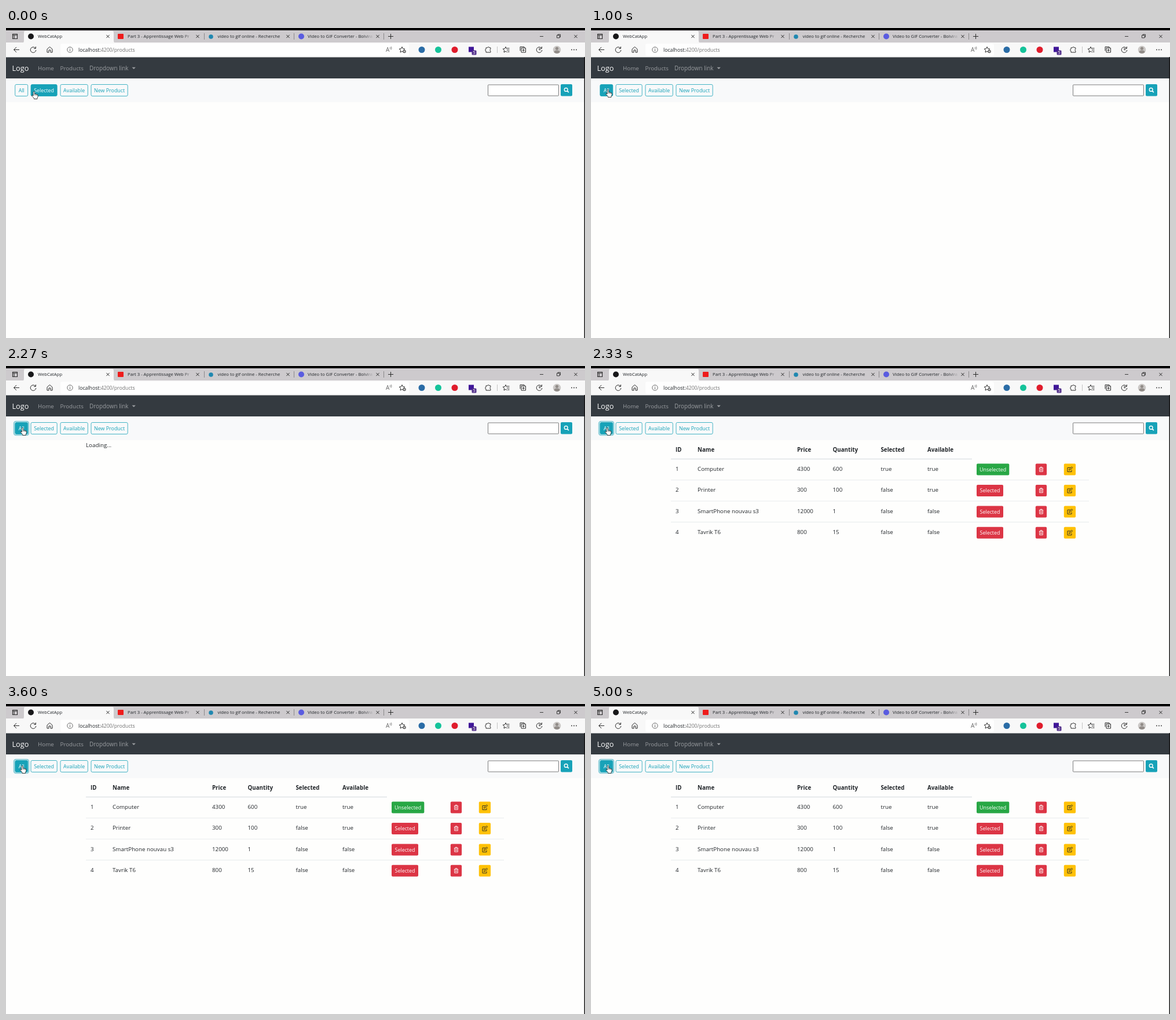
Write an HTML page that moves like this. It is 1000 px wide and 535 px high and loops after 5070 ms.

```html
<!DOCTYPE html>
<html lang="en">
<head>
<meta charset="utf-8">
<title>Product catalogue</title>
<style>
  html, body { margin: 0; width: 100%; height: 100%; overflow: hidden; background: #fefefd; }
  svg { display: block; width: 100%; height: 100%; font-family: "Open Sans", "Noto Sans", sans-serif; }
  text { white-space: pre; }
</style>
</head>
<body>
<svg id="stage" viewBox="0 0 1000 535"></svg>
<script>
const LOOP = 5070;
const TEAL = '#17a2b8', GREEN = '#28a745', RED = '#dc3545', YELLOW = '#ffc107';
const INK = '#212529', ICON = '#2b2b2b', STRIP = '#cdcacd', BAR = '#f8f8f8', PAGE = '#fefefd';

const rect = (x, y, w, h, fill, extra = '') =>
  `<rect x="${x}" y="${y}" width="${w}" height="${h}" fill="${fill}" ${extra}/>`;
const text = (x, y, size, fill, value, extra = '') =>
  `<text x="${x}" y="${y}" font-size="${size}" fill="${fill}" ${extra}>${value}</text>`;
const stroke = (d, color = ICON, width = 1, extra = '') =>
  `<path d="${d}" fill="none" stroke="${color}" stroke-width="${width}" ${extra}/>`;
const dot = (x, y, r, fill, extra = '') =>
  `<circle cx="${x}" cy="${y}" r="${r}" fill="${fill}" ${extra}/>`;
const at = (x, y, content) => `<g transform="translate(${x} ${y})">${content}</g>`;
const cross = (x, y, r = 2.6) =>
  stroke(`M${x - r} ${y - r}l${2 * r} ${2 * r}m0 ${-2 * r}l${-2 * r} ${2 * r}`);

function tabs() {
  const title = (x, value) => text(x, 17.3, 7.7, INK, value);
  const fade = x => rect(x, 8, 18, 13, 'url(#fade)');
  return rect(0, 0, 1000, 4, '#000') + rect(0, 4, 1000, 22, STRIP) +
    `<path d="M27 26q4 0 4-4V8q0-3 3-3H183q3 0 3 3V22q0 4 4 4z" fill="${BAR}"/>` +
    stroke('M11.5 10.5h8v8h-8zM11.5 12.2h8M14 12v6.5', ICON, 1.1) +
    dot(43, 14.5, 5, '#18181a') + title(55, 'WebCatApp') +
    rect(193, 10, 10, 9, '#ee1c1c', 'rx="1"') + title(210, 'Part 3 - Apprentissage Web Pr') + fade(306) +
    dot(354, 15, 3.8, '#2088b0') + title(365.5, 'video to gif online - Recherche') +
    dot(510, 14.5, 5, '#5a5ce0') + title(521, 'Video to GIF Converter - Bolvira') + fade(617) +
    [176, 331, 487, 642].map(x => cross(x, 14.5)).join('') +
    [342.5, 497.5, 652.5].map(x => stroke(`M${x} 9v11`, '#8a888a')).join('') +
    stroke('M660 14.5h9M664.5 10v9') +
    stroke('M922 14.5h6M951.5 12.5h4.5v4.5h-4.5zM953 12.3v-1.2h4.5v4.5h-1.3', ICON, .9) + cross(984, 14.5);
}

function toolbar() {
  const muted = '#666';
  const circleArrow = (x, y) => stroke(`M${x + 4} ${y - 2.5}a4.8 4.8 0 1 0 .8 3M${x + 4.4} ${y - 5.5}v3.3h-3.4`);
  const star = (x, y) => stroke(`M${x} ${y - 5}l1.5 3.2 3.4.4-2.5 2.4.6 3.5-3-1.7-3 1.7.6-3.5-2.5-2.4 3.4-.4z`);
  return rect(0, 25, 1000, 25.5, BAR) + rect(94, 27, 602, 21, '#fefefe', 'rx="3"') +
    stroke('M23 37.5h-9.5m4.5-4.5l-4.5 4.5 4.5 4.5') + circleArrow(47, 37.5) +
    stroke('M71 36.5l4.5-4 4.5 4v5.5h-3v-4h-3v4h-3z') +
    dot(110.5, 37.5, 4.7, 'none', `stroke="${muted}"`) + stroke('M110.5 36.5v3.5M110.5 34.5v1', muted) +
    text(125, 40.7, 8.7, INK, 'localhost:<tspan fill="#727272">4200/products</tspan>') +
    text(656, 41, 10, muted, 'A') + stroke('M663 33q1.5 1.5 0 3.5M665 32q2 2.5 0 5.5', muted, .8) +
    star(684, 37.5) + dot(688, 40.5, 2.8, muted) + stroke('M686.5 40.5h3M688 39v3', BAR, .7) +
    dot(718, 37.5, 5.5, '#2a6ca6') + dot(746.5, 37.5, 5.5, '#15c39a') + dot(775, 37.5, 5.5, '#e01c2c') +
    rect(799, 32.5, 9, 9, '#3f1698') + rect(804.5, 38.5, 8, 8, '#54328c', 'rx="1.5"') +
    text(808.5, 45.2, 6.8, '#fff', '5', 'text-anchor="middle"') +
    stroke('M829 34h2.5a1.8 1.8 0 0 1 3.4 0h2v2.5a1.8 1.8 0 0 0 0 3.2V42H829v-2.3a1.8 1.8 0 0 1 0-3.4z') +
    stroke('M848.5 32v11', '#c4c4c4') +
    star(863, 37.5) + rect(865, 34, 5, 8, BAR) + stroke('M865 35h4.5M865 38h4.5M866 41h3.5') +
    stroke('M888 39.5v-7h7v2M890 34.5h7.5v7.5H890zM893.7 36v4.5M891.5 38.2h4.5') +
    circleArrow(921, 37.5) + stroke('M921 34.5v3.2h2.5') +
    dot(951.5, 37.5, 6.8, '#cac7c5') + dot(951.5, 35.3, 2.6, '#918c88') +
    `<path d="M946.5 42q0-3.6 5-3.6t5 3.6q-5 4-10 0z" fill="#918c88"/>` +
    [977, 981, 985].map(x => dot(x, 37.5, .9, ICON)).join('');
}

function button(x, y, w, label, fill, h = 20) {
  return rect(x, y, w, h, fill, 'rx="2"') +
    text(x + w / 2, y + 13.2, 8.9, '#fff', label, 'text-anchor="middle"');
}

// Outline button whose fill and label follow the hover amount.
function outlineButton(id, x, w, label) {
  return rect(x, 97.5, w, 20, TEAL, `id="${id}-fill" rx="2.2" fill-opacity="0" stroke="${TEAL}" stroke-width=".8"`) +
    text(x + w / 2, 110.7, 8.9, TEAL, label, `id="${id}-label" text-anchor="middle"`);
}

function appHeader() {
  const muted = '#9a9da0';
  return rect(0, 50.5, 1000, 36.5, '#343a40') +
    text(10.5, 74, 12.7, '#fff', 'Logo') + text(55, 73, 9.8, muted, 'Home') +
    text(93.5, 73, 9.8, muted, 'Products') + text(144, 73, 9.9, muted, 'Dropdown link') +
    `<path d="M217.5 67.7h6.4l-3.2 3.2z" fill="${muted}"/>` +
    rect(0, 87, 1000, 41, '#f8f9fa') +
    rect(13.7, 95.8, 25.6, 23.4, 'none', `id="ring" rx="3.4" stroke="${TEAL}" stroke-opacity=".5" stroke-width="2"`) +
    outlineButton('all', 15.7, 22, 'All') + outlineButton('selected', 43, 45.2, 'Selected') +
    outlineButton('available', 94, 47.3, 'Available') + outlineButton('create', 147, 63.2, 'New Product') +
    rect(832.5, 98, 122, 19, '#fff', 'rx="1" stroke="#7c7c7c"') +
    rect(958, 97, 20, 20.5, TEAL, 'rx="2"') +
    dot(967.2, 106.4, 2.9, 'none', 'stroke="#fff" stroke-width="1.4"') + stroke('M969.3 108.6l2.6 2.6', '#fff', 1.7);
}

function table() {
  const columns = [146, 184, 356, 417.5, 500.5, 581];
  const line = '#dee2e6';
  const cells = (values, y, extra) =>
    values.map((value, i) => text(columns[i], y, 9.75, INK, value, extra)).join('');
  const trash = stroke('M-3.7-2.5h7.4M-1.5-2.7v-1.4h3v1.4M-2.8-2.5v6.2h5.6v-6.2M-1-.8v3M1-.8v3', '#fff', .9);
  const edit = stroke('M1-3h-5v7h7V1M-1.3 1.4l.3-1.7 4.3-4.2 1.4 1.4L.4 1.1z', INK, .9);
  const rows = [
    [1, 'Computer', 4300, 600, true, true],
    [2, 'Printer', 300, 100, false, true],
    [3, 'SmartPhone nouvau s3', 12000, 1, false, false],
    [4, 'Tavrik T6', 800, 15, false, false],
  ];
  return cells(['ID', 'Name', 'Price', 'Quantity', 'Selected', 'Available'], 148.4, 'font-weight="700"') +
    stroke('M138 160.5H658', line, 1.3) +
    rows.map((row, i) => {
      const y = 168.5 + i * 36.45;
      return (i ? stroke(`M138 ${160.5 + i * 36.3}H860`, line, .7) : '') + cells(row, 181.2 + i * 36.2) +
        (row[4] ? button(666, y, 56.3, 'Unselected', GREEN) : button(666, y, 46, 'Selected', RED)) +
        rect(767.8, y, 19.3, 20, RED, 'rx="2"') + at(777.5, y + 10, trash) +
        rect(816.8, y, 20.3, 20, YELLOW, 'rx="2"') + at(827, y + 10, edit);
    }).join('');
}

const hand = `<path d="M-1.2 7V.7Q-1.2-.5 0-.5T1.2.7v3.2q1.2-.6 2 .4 1.2-.4 1.9.5 1.7-.2 1.7 1.4v2.3L5.6 11v1.5H.1V11.2L-3.3 7.4q-.6-1.4.7-1.5z"
  fill="#fff" stroke="#18181a" stroke-width=".8"/>` + stroke('M1.2 4v2.5M3.2 4.5v2M5.1 5v1.7', '#18181a', .6);

document.getElementById('stage').innerHTML =
  `<defs><linearGradient id="fade"><stop stop-color="${STRIP}" stop-opacity="0"/><stop offset="1" stop-color="${STRIP}"/></linearGradient></defs>` +
  rect(0, 0, 1000, 535, PAGE) + tabs() + toolbar() + appHeader() +
  text(138, 139.8, 9.8, INK, 'Loading...', 'id="loading"') +
  `<g id="table">${table()}</g>` + stroke('M999.3 50V535', '#111', 1.4) +
  `<g id="cursor">${hand}</g>`;

const $ = id => document.getElementById(id);
const clamp = v => Math.max(0, Math.min(1, v));
const progress = (t, start, length = 150) => clamp((t - start) / length);
const show = (id, visible) => $(id).setAttribute('visibility', visible ? 'visible' : 'hidden');

function setHover(id, amount) {
  $(id + '-fill').setAttribute('fill-opacity', amount);
  const [r, g, b] = [23, 162, 184].map(c => Math.round(c + (255 - c) * amount));
  $(id + '-label').setAttribute('fill', `rgb(${r},${g},${b})`);
}

function draw(t) {
  const move = progress(t, 60, 470);
  const eased = move * move * (3 - 2 * move);
  const nudge = progress(t, 2200, 130) - progress(t, 4670, 130);
  const x = 48.3 - 19 * eased - 1.3 * nudge;
  const y = 110 - 3 * eased + 9 * Math.sin(Math.PI * move);
  $('cursor').setAttribute('transform', `translate(${x} ${y})`);
  setHover('selected', 1 - progress(t, 220));
  setHover('all', progress(t, 380));
  $('ring').setAttribute('opacity', progress(t, 1650));
  show('loading', t >= 1800 && t < 2330);
  show('table', t >= 2330);
}

const start = performance.now();
function tick() {
  draw((performance.now() - start) % LOOP);
  requestAnimationFrame(tick);
}
tick();
</script>
</body>
</html>
```
